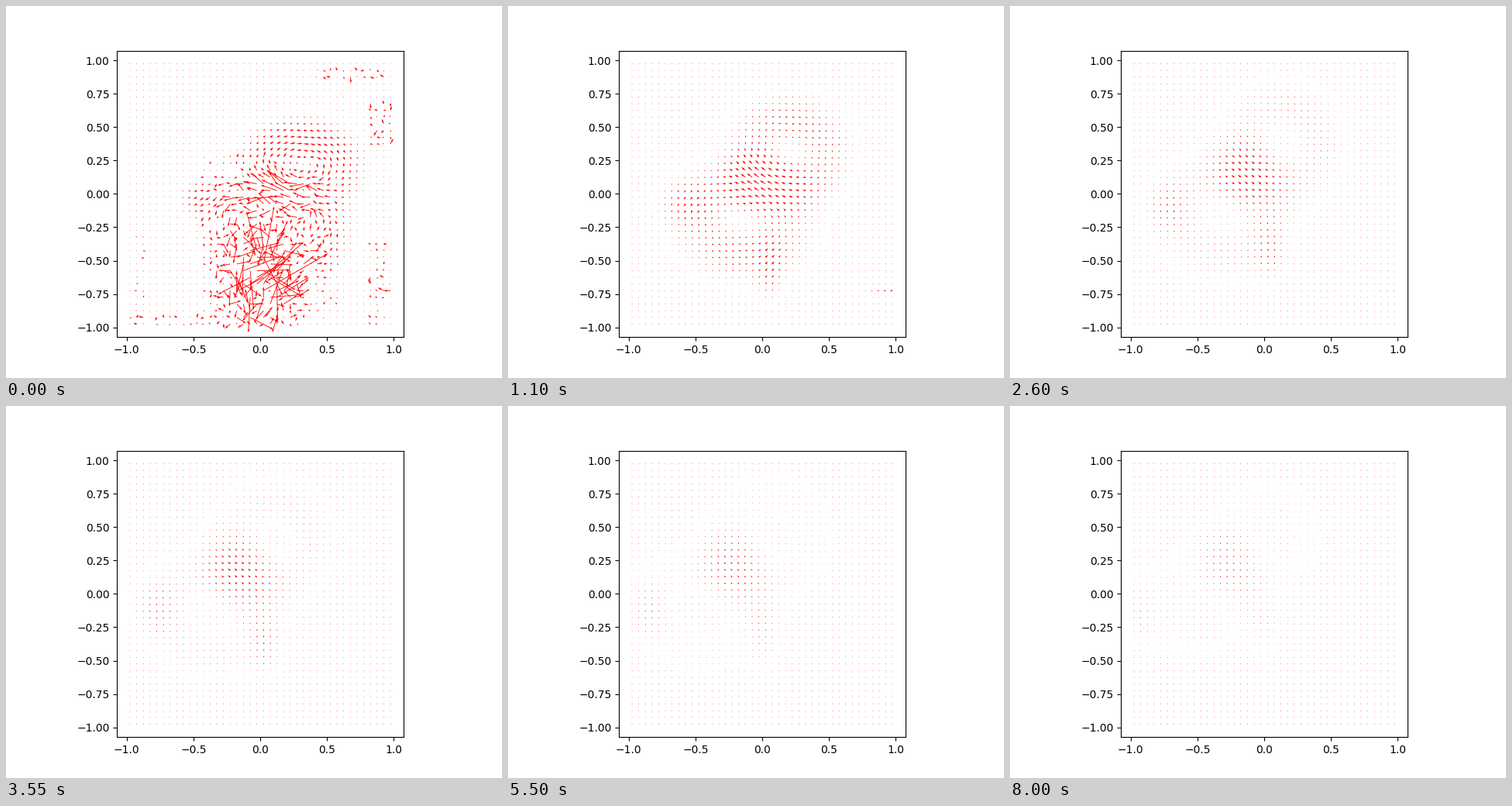
Write a matplotlib script that moves like this. It is 640 px wide and 480 px high and loops after 8050 ms.

```python
import numpy as np
import matplotlib.pyplot as plt
from matplotlib.animation import FuncAnimation

FRAMES, STEP_MS, N = 161, 50, 40
AXES_PX = 369.6                      # arrow lengths are given in pixels
SETTLE = 6                           # frames until the flow is smooth

grid = np.linspace(-0.975, 0.975, N)
X, Y = np.meshgrid(grid, grid)


def bell(x, y, sx, sy):
    return np.exp(-((X - x) / sx) ** 2 / 2 - ((Y - y) / sy) ** 2 / 2)


def box(x0, x1, y0, y1):
    return (X > x0) & (X < x1) & (Y > y0) & (Y < y1)


def age(n):
    return (max(n, SETTLE) + 1) / (SETTLE + 1)


def drift(n, start, end):
    """Move from start to end evenly in logarithmic time."""
    s = np.log(age(n)) / np.log(age(FRAMES - 1))
    return np.array(start) * (1 - s) + np.array(end) * s


def vortex(n, start, end, speed):
    """Gaussian vortex (x, y, sx, sy); positive speed turns left."""
    x, y, sx, sy = drift(n, start, end)
    g = speed * age(n) ** -0.65 * np.exp(0.5) * bell(x, y, sx, sy)
    return np.array([-g * (Y - y) / sy, g * (X - x) * sy / sx ** 2])


def jet(n, start, end, u, v, decay):
    g = age(n) ** -decay * bell(*drift(n, start, end))
    return np.array([u * g, v * g])


def blur(f):
    """Average each cell with its neighbours along both axes."""
    for _ in range(2):
        p = np.pad(f, ((0, 0), (0, 0), (1, 1)), mode="edge")
        f = (p[..., :-2] + 2 * p[..., 1:-1] + p[..., 2:]) / 4
        f = f.swapaxes(1, 2)
    return f


def opening():
    rng = np.random.default_rng(5)
    size = (1.8 * box(-.45, .62, -.97, .3)
            + 2.5 * box(-.35, .5, -.6, .12)
            + 3.0 * box(.82, .95, -1, -.35)
            + 4.0 * box(.82, 1, .35, .7)
            + 3.5 * box(.4, .95, .85, .95)
            + 2.0 * box(-.95, -.85, -1, -.3)
            + 2.5 * box(-1, .3, -1, -.88)
            + 42 * bell(0, -.64, .15, .19)
            + 11 * bell(.15, 0, .13, .08))
    return rng.normal(0, 0.75, (2, N, N)) * size


# The opening disorder diffuses away within a second.
noise = [opening()]
for _ in range(20):
    noise.append(0.7 * blur(noise[-1]))


def field(n):
    f = vortex(n, (.30, .21, .23, .16), (.02, .43, .30, .34), -7.5)
    f += vortex(n, (.12, -.25, .27, .18), (-.52, -.08, .36, .33), 7.5)
    f += jet(n, (.09, .03, .10, .09), (-.30, .28, .16, .18), -5, 6, .8)
    f += jet(n, (.07, -.78, .05, .15), (.02, -.25, .10, .20), 1, 5.5, .55)
    f += jet(n, (-.35, -.02, .15, .09), (-.92, -.13, .10, .17), -5, 0, 1.2)
    f += jet(n, (-.35, -.02, .15, .09), (-.92, -.13, .10, .17), 0, -2.5, .3)
    f += jet(n, (.98, -.72, .08, .025), (.98, -.72, .25, .025), -9, 0, .8)
    if n < len(noise):
        f += noise[n]
    return f


fig, ax = plt.subplots(figsize=(6.4, 4.8), dpi=100)
ax.set_aspect("equal")
arrows = ax.quiver(X, Y, *field(0), color="r",
                   scale=AXES_PX, scale_units="width")
ax.set_xlim(-1.0725, 1.0725)
ax.set_ylim(-1.0725, 1.0725)


def update(n):
    arrows.set_UVC(*field(n))
    return arrows,


anim = FuncAnimation(fig, update, frames=FRAMES, interval=STEP_MS,
                     repeat=True, repeat_delay=0, blit=False)
plt.show()
```
